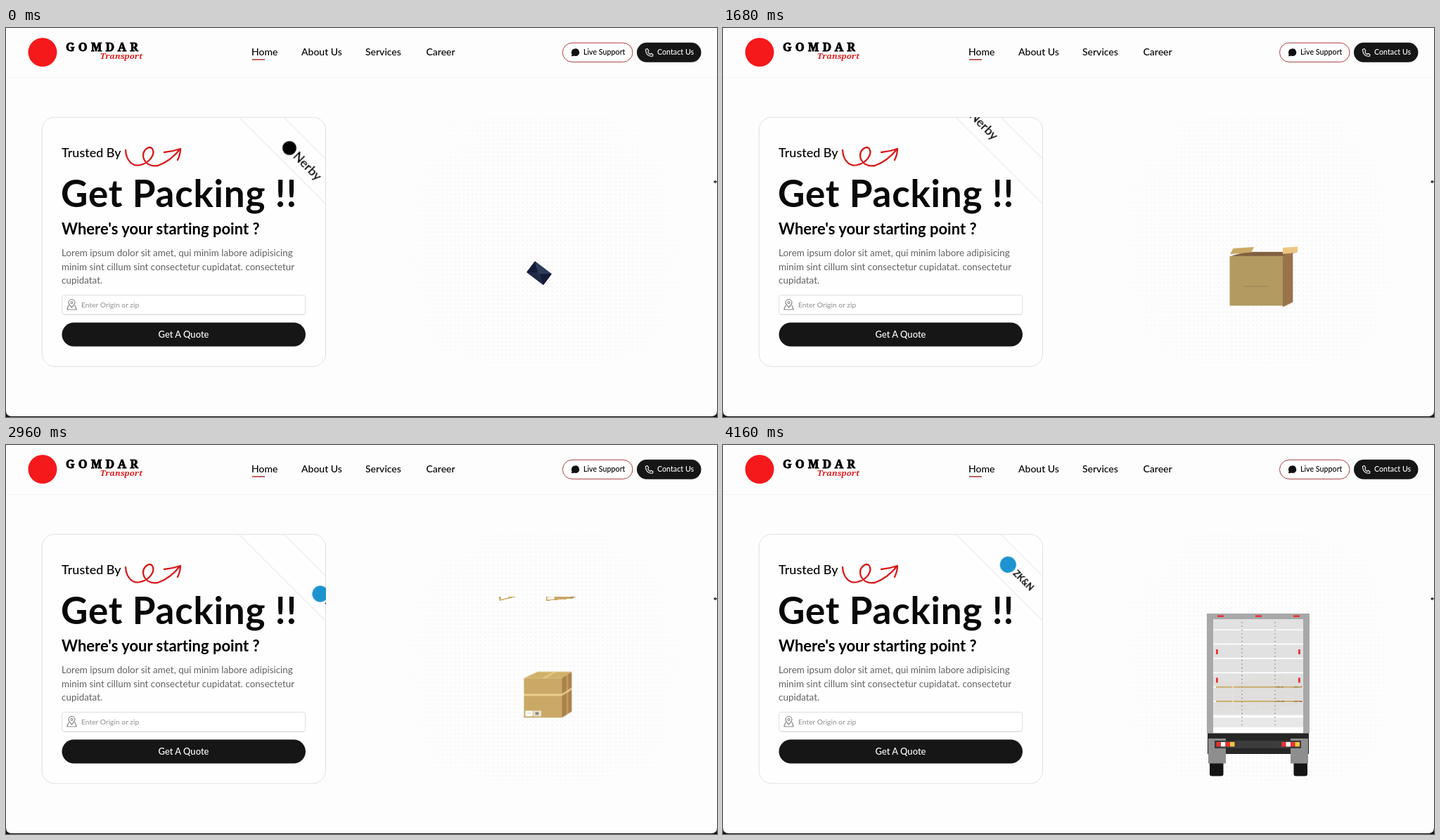
Recreate the animation shown at these times as an HTML page. Size 1011 by 554 pixels, loop 4.24 s.

```html
<!DOCTYPE html>
<html lang="en">
<head>
<meta charset="utf-8">
<title>Get Packing</title>
<style>
  html, body { margin: 0; width: 100%; height: 100%; overflow: hidden; background: #111; }
  svg {
    display: block; width: 100%; height: 100%;
    font-family: Lato, "Open Sans", sans-serif; font-weight: 500; font-variant-ligatures: none;
  }
  .bold { font-weight: 700; }
  .nav { font-size: 14px; }
  .small { font-size: 10.7px; }
  .copy { font-size: 13.45px; font-weight: 400; fill: #636363; }
  .line { fill: none; stroke-linecap: round; stroke-linejoin: round; }
  #envelope { transform-origin: 758px 349px; }
  #bubble { transform-origin: 801px 320px; }
  #body { transform-origin: 796px 325px; }
  #side { transform-origin: 796px 325px; }
  #opening { transform-origin: 721px 325px; }
  #flaps { transform-origin: 769px 321px; }
  #truck { transform-origin: 761px 356px; }
</style>
</head>
<body>
<svg viewBox="0 0 1011 554" preserveAspectRatio="none">
  <defs>
    <pattern id="dots" width="6" height="6" patternUnits="userSpaceOnUse">
      <circle cx="3" cy="3" r=".75" fill="#e8e8e8"/>
    </pattern>
    <radialGradient id="fade">
      <stop offset=".35" stop-color="#fff"/>
      <stop offset="1" stop-color="#000"/>
    </radialGradient>
    <mask id="dotMask"><ellipse cx="765" cy="315" rx="255" ry="310" fill="url(#fade)"/></mask>
    <clipPath id="cardClip"><rect x="51" y="127" width="403.5" height="355" rx="18"/></clipPath>
    <clipPath id="dropClip"><rect x="640" y="216" width="240" height="260"/></clipPath>
    <clipPath id="doorClip"><rect x="697" y="248" width="128" height="162"/></clipPath>
  </defs>

  <rect width="1011" height="554" fill="#111"/>
  <path d="M0 0H1011V545Q1011 553 1003 553H8Q0 553 0 545Z" fill="#fdfdfd"/>
  <rect x="520" y="127" width="455" height="355" fill="url(#dots)" mask="url(#dotMask)"/>

  <!-- header -->
  <path d="M0 70.5H1011" stroke="#f3f3f3"/>
  <circle cx="52" cy="34.5" r="20.5" fill="#f5191c"/>
  <text x="85" y="33" font-family="'Noto Serif', serif" font-size="16.5" font-weight="900" letter-spacing="5" stroke="#000" stroke-width=".8">GOMDAR</text>
  <text x="194" y="44" text-anchor="end" font-family="'Noto Serif', serif" font-size="11.5" font-weight="700" font-style="italic" fill="#e51b1e">Transport</text>
  <g class="nav">
    <text x="349" y="39">Home</text>
    <text x="420" y="39">About Us</text>
    <text x="511" y="39">Services</text>
    <text x="597.5" y="39">Career</text>
  </g>
  <path d="M350 45H368" stroke="#b03a3e" stroke-width="1.6"/>
  <rect x="791.5" y="21.2" width="99.5" height="27.2" rx="13.6" fill="#fff" stroke="#ab3f43"/>
  <path d="M804 40Q805 38 804 35A5.6 5.6 0 0 1 815 33.5A5 5 0 0 1 808 39.5Q806 40.5 804 40Z" fill="#111"/>
  <text class="small" x="821" y="38">Live Support</text>
  <rect x="897" y="20.8" width="91.5" height="28" rx="14" fill="#161616"/>
  <path class="line" d="M909.5 30.5L912 29.5L914 32.5L912.7 34Q913.7 36.5 916 37.5L917.5 36.2L920 38L919.5 40.2Q910 41 909.5 30.5Z" stroke="#fff" stroke-width="1.1"/>
  <text class="small" x="926" y="38" fill="#fff">Contact Us</text>

  <!-- quote card -->
  <rect x="51.2" y="127.2" width="403.3" height="354.8" rx="18" fill="#fff" fill-opacity=".2" stroke="#e0e0e0"/>
  <g clip-path="url(#cardClip)">
    <path d="M331 127L455 251M395 127L455 187" stroke="#e2e2e2"/>
    <g id="brandA">
      <circle r="10"/>
      <text x="12" y="6" font-size="18">Nerby</text>
    </g>
    <g id="brandB">
      <circle r="11.5" fill="#1d94cf"/>
      <text class="bold" x="14" y="4.5" font-size="12.5">ZK&amp;N</text>
    </g>
  </g>
  <text x="79" y="184" font-size="18">Trusted By</text>
  <path class="line" d="M170 174C171 189 180 198 191 195C204 192 213 180 208 172C204 167 195 173 195 182C196 193 206 198 216 196C228 192 239 183 248 172M225 177Q237 176 248 172Q248 180 244 188" stroke="#d81a1a" stroke-width="2.3"/>
  <text class="bold" x="78" y="255" font-size="53" letter-spacing=".75" fill="#080808">Get Packing !!</text>
  <text class="bold" x="79" y="293.5" font-size="22">Where's your starting point ?</text>
  <g class="copy">
    <text x="79" y="325">Lorem ipsum dolor sit amet, qui minim labore adipisicing</text>
    <text x="79" y="344.5">minim sint cillum sint consectetur cupidatat. consectetur</text>
    <text x="79" y="364">cupidatat.</text>
  </g>
  <rect x="79.7" y="380.5" width="346" height="27.5" rx="3" fill="#fff" stroke="#dedede"/>
  <path d="M82 408.3H424" stroke="#d4d4d4" stroke-width=".7"/>
  <g class="line" stroke="#858585" stroke-width="1.2">
    <path d="M93.5 398Q89 393 89 391A4.5 4.5 0 0 1 98 391Q98 393 93.5 398ZM89 395L86.8 401H100.2L98 395"/>
    <circle cx="93.5" cy="391" r="1.5"/>
  </g>
  <text x="107" y="398" font-size="10.3" font-weight="400" fill="#8f8f8f">Enter Origin or zip</text>
  <rect x="79.5" y="419.5" width="346.5" height="34" rx="17" fill="#161616"/>
  <text x="252.5" y="441" font-size="13" text-anchor="middle" fill="#fff">Get A Quote</text>

  <!-- envelope -->
  <g id="envelope">
    <rect x="720.5" y="324" width="75.5" height="50" rx="2.5" fill="#151c38"/>
    <path d="M722 373.5L758 346L794.5 373.5Z" fill="#1f2845"/>
    <path d="M721.5 324.5H795L760 352Q758 354 756 352Z" fill="#2d3b5a"/>
  </g>
  <g id="bubble">
    <circle cx="819.7" cy="307" r="16.2" fill="#141b38"/>
    <path d="M805 310L800.5 320L815 321Z" fill="#141b38"/>
    <text x="819.7" y="314" font-size="20" font-weight="900" text-anchor="middle" fill="#fff">3</text>
  </g>

  <!-- open box -->
  <g id="openBox">
    <path id="opening" d="M721 325L743 316H817L796 325Z" fill="#80603f"/>
    <g id="body">
      <rect x="720.5" y="325" width="75.5" height="81" fill="#b29a61"/>
      <path d="M741 374.3H776" stroke="#8f7b50" stroke-width=".8"/>
      <path id="side" d="M796 325L817 316V400L796 408Z" fill="#99734c"/>
    </g>
    <g id="flaps">
      <path d="M725.5 294L755 285.5L751 316L721 325Z" fill="#c9a965"/>
      <path d="M796 290L817 283.5V316L796 325Z" fill="#ecc580"/>
    </g>
  </g>

  <g id="truck"></g>
  <g clip-path="url(#dropClip)">
    <g transform="translate(776 372)"><g id="boxRight"></g></g>
    <g transform="translate(701 378)"><g id="boxLeft"></g></g>
    <g id="boxMain"></g>
  </g>
  <g clip-path="url(#doorClip)"><g id="door"></g></g>

  <path d="M1006 219L1009 216.5V218.2H1011V219.8H1009V221.5Z" fill="#222"/>
</svg>

<script>
const LOOP = 4240, STEP = 80;
const byId = id => document.getElementById(id);
const rect = (x, y, w, h, fill, extra = '') =>
  `<rect x="${x}" y="${y}" width="${w}" height="${h}" fill="${fill}" ${extra}/>`;
const poly = (points, fill) => `<polygon points="${points.join(' ')}" fill="${fill}"/>`;

// A taped carton whose front bottom left corner is the origin.
function carton(w, h, d, rise, { label = '', cross = false } = {}) {
  const tape = '#ecd18e', bandY = -h * .6, band = h * .05;
  const sideX = k => w + d * k;
  const sideStrip = (a, b, y0, y1, fill) => poly([
    [sideX(a), y0 - rise * a], [sideX(b), y0 - rise * b],
    [sideX(b), y1 - rise * b], [sideX(a), y1 - rise * a]], fill);
  return rect(0, -h, w, h, '#c9a965')
    + poly([[0, -h], [d * 1.4, -h - rise], [w + d, -h - rise], [w, -h]], '#d2b06a')
    + poly([[w * .48, -h], [w * .8, -h - rise], [w * .86, -h - rise], [w * .56, -h]], tape)
    + sideStrip(0, 1, 0, -h, '#a9814c')
    + sideStrip(.45, .65, 0, -h, '#c59b5c')
    + sideStrip(0, 1, bandY, bandY + band, tape)
    + rect(0, bandY, w, band, tape)
    + (cross ? rect(w * .48, -h, 2.5, h, tape) : '')
    + label;
}

byId('boxMain').innerHTML = carton(54, 56.5, 14, 9, {
  label: rect(2, -10, 10.5, 8, '#fff') + rect(13.5, -10, 11, 8, '#ece7dc')
    + rect(4, -7, 6, 1, '#cfc3a4') + rect(16, -8, 5, 4, '#8d8674')
});
byId('boxLeft').innerHTML = carton(47, 39, 8, 3, { cross: true, label: rect(2.5, -5, 11, 3.5, '#fff') });
byId('boxRight').innerHTML = carton(36, 39, 12, 4, { label: rect(2, -5, 10, 3.5, '#fff') });

const lights = x => ['#e8322f', '#fff', '#e8322f', '#f4c542']
  .map((c, i) => rect(x + i * 6.5, 423, 6.5, 6.5, c)).join('');
const corner = (x, wheelX) => rect(wheelX, 448, 19.5, 23.5, '#141414', 'rx="3"')
  + rect(x, 418, 25, 35.5, '#8e8e8e');

byId('truck').innerHTML = rect(688, 240, 146, 170.5, '#a8a8a8')
  + rect(697, 248, 128, 162.5, '#fdfdfd')
  + [703, 757, 811].map(x => rect(x, 242.5, 9, 2.5, '#e8322f')).join('')
  + rect(689, 410.5, 144, 29.5, '#262626')
  + corner(690, 692) + corner(807, 811.5)
  + rect(699, 421, 123, 11, '#3b3b3b')
  + lights(701.5) + lights(794);

const slats = [[248, 14.5], ...Array.from({ length: 6 }, (_, i) => [264 + i * 20.4, 18.6])];
byId('door').innerHTML = slats.map(([y, h]) => rect(697, y, 128, h, '#e0e0e0', 'opacity=".97"')).join('')
  + rect(697, 388.5, 128, 13.5, '#e8e8e8')
  + [738, 785].map(x => `<path d="M${x} 252V402" stroke="#8a8a8a" stroke-width="1.4" stroke-dasharray="1.4 4"/>`).join('')
  + [291, 331.5].map(y => rect(701, y, 2.8, 7, '#e8322f') + rect(818, y, 2.8, 7, '#e8322f')).join('');

// Each step is [ms, value, easing to the next step].
const tracks = [
  ['brandA', 'transform', [0, 'translate(403px,171px) rotate(45deg)'], [LOOP, 'translate(257.3px,25.3px) rotate(45deg)']],
  ['brandB', 'transform', [0, 'translate(549.7px,314.7px) rotate(45deg)'], [LOOP, 'translate(402.6px,167.6px) rotate(45deg)']],

  ['envelope', 'transform', [0, 'rotate(37deg) scale(.4)', 'ease-out'], [320, 'rotate(0deg) scale(1)']],
  ['envelope', 'opacity', [1480, 1], [1600, 0]],
  ['bubble', 'transform', [320, 'scale(0)', 'ease-out'], [560, 'scale(1.08)'], [640, 'scale(1.03)'], [800, 'scale(1)'],
    [1320, 'scale(1)', 'ease-in'], [1480, 'scale(0)']],

  ['openBox', 'opacity', [1480, 0], [1560, 1], [2320, 1], [2400, 0]],
  ['body', 'transform', [1500, 'scaleY(.617)', 'ease-in-out'], [1800, 'scaleY(1)']],
  ['side', 'transform', [1560, 'scaleX(0)', 'ease-out'], [1800, 'scaleX(1)']],
  ['opening', 'transform', [1560, 'scaleY(0)', 'ease-out'], [1800, 'scaleY(1)']],
  ['flaps', 'transform', [1640, 'scaleY(0)', 'ease-out'], [1880, 'scaleY(1)'],
    [2040, 'scaleY(1)', 'ease-in'], [2280, 'scaleY(0)']],

  ['boxMain', 'opacity', [2240, 0], [2320, 1]],
  ['boxMain', 'transform', [2800, 'translate(721px,406px) scale(1.39)', 'ease-in-out'],
    [3080, 'translate(746px,377.5px) scale(.76)']],
  ['boxLeft', 'transform', [2880, 'translate(1px,-168px) rotate(-15deg)'],
    [2960, 'translate(1px,-156px) rotate(-14deg)', 'ease-in'], [3280, 'translate(0px,0px) rotate(0deg)']],
  ['boxRight', 'transform', [2880, 'translate(-8px,-162px) rotate(-6deg)'],
    [2960, 'translate(-8px,-150px) rotate(-5deg)', 'ease-in'], [3280, 'translate(0px,0px) rotate(0deg)']],

  ['truck', 'transform', [3720, 'scale(0)', 'ease-out'], [4000, 'scale(1)']],
  ['door', 'transform', [3960, 'translateY(-165px)', 'ease-out'], [4160, 'translateY(0px)']],
];

for (const [id, prop, ...steps] of tracks) {
  const frames = steps.map(([ms, value, easing = 'linear']) => ({ offset: ms / LOOP, [prop]: value, easing }));
  const first = { ...frames[0], offset: 0, easing: 'linear' };
  const last = { ...frames.at(-1), offset: 1 };
  if (frames[0].offset > 0) frames.unshift(first);
  if (frames.at(-1).offset < 1) frames.push(last);
  byId(id).animate(frames, { duration: LOOP, iterations: Infinity, easing: `steps(${LOOP / STEP})` });
}
</script>
</body>
</html>
```
